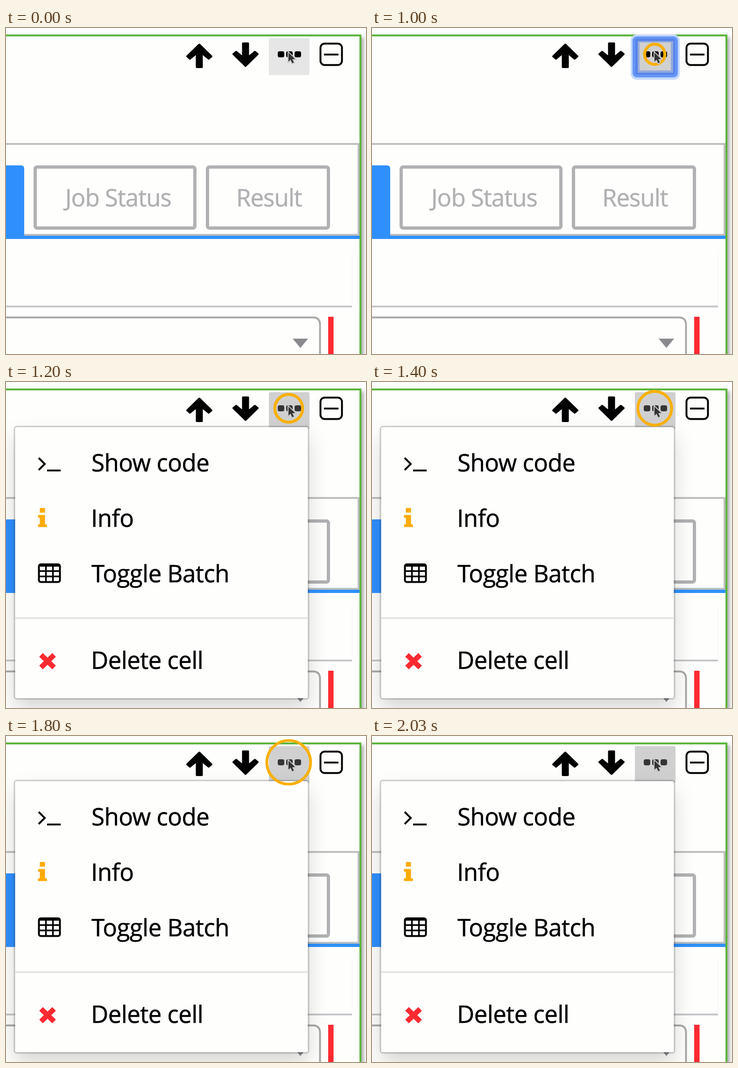
Write an HTML page that moves like this. It is 771 px wide and 700 px high and loops after 2.9 s.

```html
<!DOCTYPE html>
<html lang="en">
<head>
<meta charset="utf-8">
<style>
html, body { margin: 0; width: 100%; height: 100%; overflow: hidden; background: #fff; }
svg { display: block; }
text { font: 51px "Open Sans", "Noto Sans", sans-serif; letter-spacing: -.02em; stroke-width: .6; }
#menu text { letter-spacing: -.01em; }
.card { filter: drop-shadow(4px 5px 5px rgba(0, 0, 0, .4)); }
.panel { filter: drop-shadow(0 22px 22px rgba(0, 0, 0, .16)); }
</style>
</head>
<body>
<svg width="771" height="700" viewBox="0 0 771 700" fill="none">
  <rect class="card" x="-40" y="16" width="799" height="760" fill="#fefefd" stroke="#5cb53c" stroke-width="4"/>

  <!-- Toolbar -->
  <g fill="#000" stroke="#000" stroke-width="4" stroke-linejoin="round">
    <path id="arrow" d="M414 35.500L440 61L434 66L419.500 54V84H408.500V54L394 66L388 61Z"/>
    <use href="#arrow" transform="rotate(180 463.5 58.5)"/>
  </g>
  <g stroke="#000" stroke-width="4">
    <rect x="673.500" y="33.500" width="46" height="46" rx="9"/>
    <path d="M681 57H712"/>
  </g>
  <rect id="button" x="563" y="22" width="87" height="79" rx="3"/>
  <g id="focus">
    <rect x="554" y="14" width="105" height="97" rx="13" fill="#c4d9fb"/>
    <rect x="558" y="18" width="97" height="88" rx="9" fill="#6595f6"/>
    <rect x="564" y="23" width="85" height="77" rx="3" fill="#5684e9"/>
    <rect x="569" y="28" width="76" height="68" fill="#94a9dc"/>
    <rect x="573" y="31" width="67" height="60" fill="#d0d0d0"/>
  </g>
  <g id="dots">
    <rect x="582" y="50" width="14" height="13" rx="4"/>
    <rect x="600" y="50" width="14" height="13" rx="4"/>
    <rect x="618" y="50" width="14" height="13" rx="4"/>
  </g>

  <!-- Tabs -->
  <path d="M0 249H755V444H39" stroke="#bfbfc0" stroke-width="4"/>
  <path d="M0 295H32Q39 295 39 302V446H757V453H0Z" fill="#2f90fd"/>
  <g stroke="#b1b1b3" stroke-width="7">
    <rect x="62.500" y="298.500" width="342" height="131" rx="4"/>
    <rect x="431.500" y="298.500" width="259" height="131" rx="4"/>
  </g>
  <g fill="#b1b1b3" stroke="#b1b1b3">
    <text x="127" y="383">Job Status</text>
    <text x="493" y="383">Result</text>
  </g>

  <!-- Form -->
  <path d="M741.500 480V596" stroke="#f2f2f2"/>
  <path d="M0 598H741" stroke="#c8c8ca" stroke-width="4"/>
  <path d="M0 621.500H657Q672.500 621.500 672.500 637V700" stroke="#a9a9aa" stroke-width="4"/>
  <path d="M614 667H647L630.500 687Z" fill="#8a8a8e"/>
  <rect x="690" y="620" width="11.500" height="80" fill="#fb2a31"/>

  <g id="menu">
    <rect class="panel" x="19.500" y="97" width="627" height="582" rx="3" fill="#fefefd"/>
    <rect x="18" y="95.500" width="630" height="585" rx="5" stroke="#000" stroke-opacity=".18" stroke-width="3"/>
    <path d="M20 507H647" stroke="#e5e5e5" stroke-width="4"/>
    <g stroke="#000" stroke-width="4">
      <path d="M70 163L83 176L70 189M88 190H117"/>
      <rect x="70.500" y="391.500" width="45" height="38" rx="4"/>
      <path d="M70 394H116" stroke-width="5"/>
      <path d="M70 406H116M70 417.500H116M85.500 395V430M100.500 395V430" stroke-width="3.500"/>
    </g>
    <path d="M73 271H83V280H73ZM69 286H83V306H87V311H69V306H73V291H69Z" fill="#fdab06" stroke="#fdab06" stroke-linejoin="round"/>
    <path d="M75 586L103 613M103 586L75 613" stroke="#fb2a31" stroke-width="11"/>
    <g fill="#000" stroke="#000">
      <text x="183" y="192">Show code</text>
      <text x="182" y="311">Info</text>
      <text x="183" y="430">Toggle Batch</text>
      <text x="182" y="616">Delete cell</text>
    </g>
  </g>

  <circle id="ripple" cx="605.500" cy="56.500" stroke="#f9b006"/>
  <path d="M605 53V72L609.500 68L613 75.500L616.500 74L613 67L619 66.500Z" fill="#333" stroke="#c8c8c8" stroke-width="4" paint-order="stroke"/>
</svg>
<script>
const LOOP = 2900, PRESS = 760, OPEN = 1070, FADE = 1800, END = 2030;
const [button, focusRing, dots, menu, ripple] =
  ["button", "focus", "dots", "menu", "ripple"].map(id => document.getElementById(id));
const clamp = v => Math.max(0, Math.min(1, v));
const show = (el, on) => el.setAttribute("visibility", on ? "visible" : "hidden");

function draw(t) {
  const open = t >= OPEN;
  show(menu, open);
  button.setAttribute("fill", open ? "#d0d0d0" : "#e6e6e6");
  dots.setAttribute("fill", open ? "#353535" : "#000");
  focusRing.setAttribute("opacity", open ? 0 : clamp((t - 800) / 100));

  // The click ring's area grows steadily.
  const age = t - PRESS;
  show(ripple, age >= 0 && t < END);
  if (age < 0) return;
  const outer = Math.sqrt(2.33 * (age + 25));
  const line = Math.min(outer, 6.6 - age / 1500);
  ripple.setAttribute("r", outer - line / 2);
  ripple.setAttribute("stroke-width", line);
  ripple.setAttribute("opacity", 1 - clamp((t - FADE) / (END - FADE)));
}

const start = performance.now();
function tick() {
  draw((performance.now() - start) % LOOP);
  requestAnimationFrame(tick);
}
tick();
</script>
</body>
</html>
```
